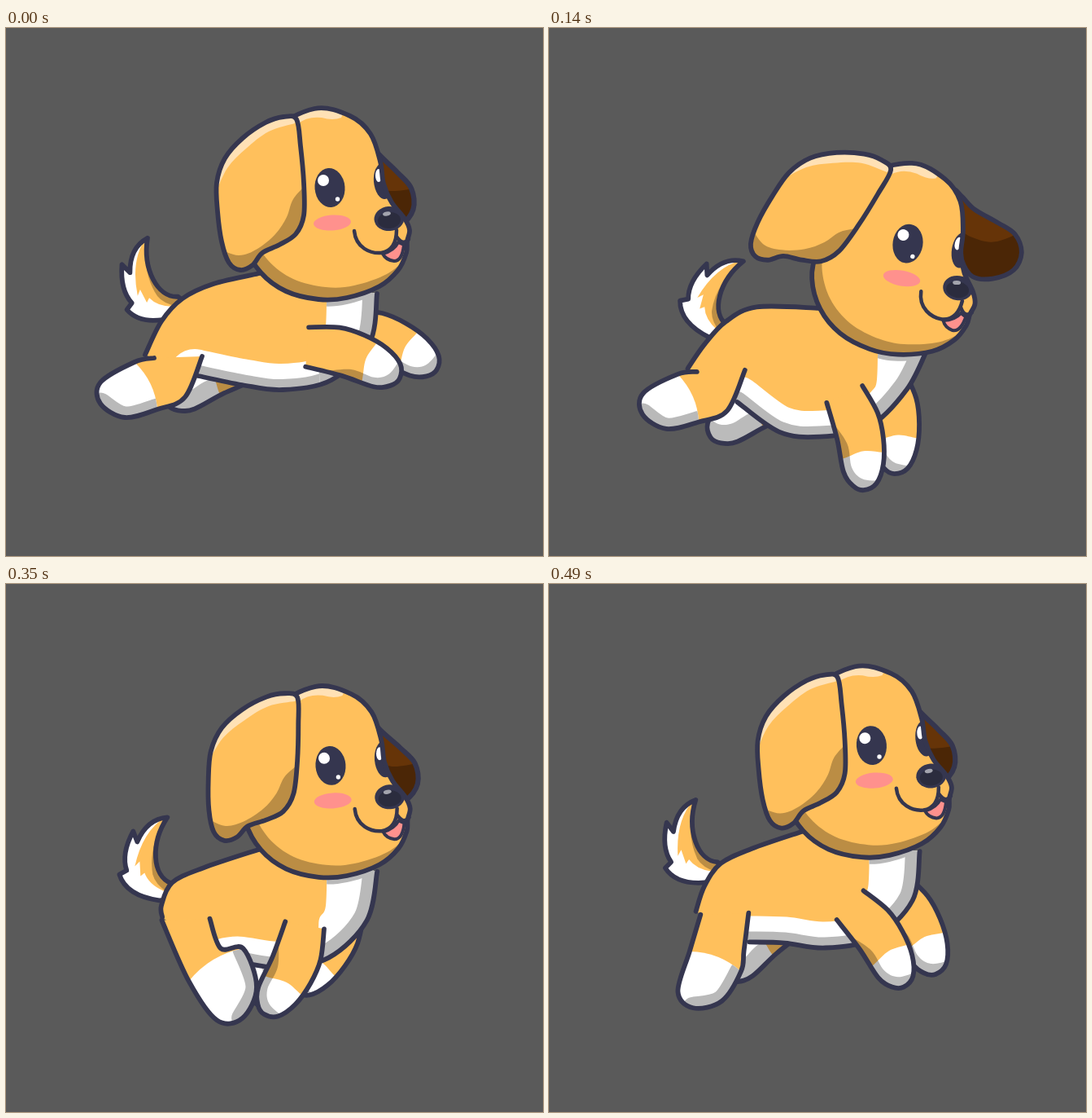
Animation, 660 px wide and 648 px high, one loop 560 ms. Source, as an HTML page with a canvas:

```html
<!DOCTYPE html>
<html lang="en">
<head>
<meta charset="utf-8">
<title>Running puppy</title>
<style>
  html, body { margin: 0; width: 100%; height: 100%; overflow: hidden; background: #5a5a5a; }
  canvas { display: block; }
</style>
</head>
<body>
<canvas id="stage" width="660" height="648"></canvas>
<script>
const ctx = document.getElementById('stage').getContext('2d');
const INK = '#35364f', FUR = '#ffc05c', WHITE = '#fff', GREY = '#b9b9b9', PINK = '#ff918d',
      GLOW = '#ffe1b5', BROWN = '#663408', SHADE = 'rgba(0,0,0,.265)';
const STEP_MS = 70, STEPS = 8;

const rad = deg => deg * Math.PI / 180;

// Straight tween through step, value pairs
function tween(step, ...keys) {
  let i = 0;
  while (keys[i + 2] <= step) i += 2;
  const [t0, v0, t1 = t0 + 1, v1 = v0] = keys.slice(i);
  return v0 + (v1 - v0) * (step - t0) / (t1 - t0);
}

// The whole run cycle follows from six signals.
function poseAt(step) {
  const drop = tween(step, 0, 0, 2.5, 1, 4, 1, 5, .37, 6, .07, 8, 0);
  const nod = tween(step, 0, 0, 2, 1, 4, .43, 5.3, -.1, 8, 0);
  const flap = tween(step, 0, 0, 2, 1, 4, .85, 5, .18, 6, 0);
  const reach = tween(step, 0, 71, 2, 11, 5, -25, 7, 33, 8, 71);
  const swing = tween(step, 0, 0, 2, -2, 4, 79, 5, 95, 7, 43, 8, 0);
  const wag = tween(step, 0, -24, 2, 18, 4, -7, 5, 0, 8, -24);

  const tuck = swing / 90;
  const shoulder = [370 - 9 * drop, 392 + 72 * drop];
  const hip = [213 + 9 * tuck, 413 + 21 * drop];
  const spine = [255 - 12 * tuck, 314 + 36 * drop + 20 * tuck];
  const throat = [456 + 10 * nod, 326 + 72 * drop + 8 * nod];
  return {
    drop, flap, reach, swing, wag, tuck, shoulder, hip, spine, throat,
    neck: [312 + 20 * nod, 301 + 66 * drop - 10 * nod],
    head: [398 + 43 * nod, 196 + 72 * drop + 11 * nod],
    tilt: 14 * nod
  };
}

// Smooth curve through flat x, y pairs
function trace(path, flat, closed = false) {
  const n = flat.length / 2;
  const at = i => {
    const k = closed ? (i + n) % n : Math.max(0, Math.min(n - 1, i));
    return [flat[2 * k], flat[2 * k + 1]];
  };
  for (let i = 0; i < (closed ? n : n - 1); i++) {
    const [a, b, c, d] = [at(i - 1), at(i), at(i + 1), at(i + 2)];
    path.bezierCurveTo(
      b[0] + (c[0] - a[0]) / 6, b[1] + (c[1] - a[1]) / 6,
      c[0] - (d[0] - b[0]) / 6, c[1] - (d[1] - b[1]) / 6, c[0], c[1]);
  }
  if (closed) path.closePath();
  return path;
}

function spline(flat, closed) {
  const path = new Path2D();
  path.moveTo(flat[0], flat[1]);
  return trace(path, flat, closed);
}

// Curve closed off with straight corners
function region(flat, corners) {
  const path = spline(flat);
  for (let i = 0; i < corners.length; i += 2) path.lineTo(corners[i], corners[i + 1]);
  path.closePath();
  return path;
}

const HEAD = spline([-19, -97, 25, -88, 50, -66, 62, -32, 66, -5, 76, 18, 92, 38, 98, 52,
  95, 66, 94, 80, 84, 101, 61, 121, 21, 135, -14, 137, -54, 127, -85, 104, -104, 70, -106, 35,
  -99, -15, -72, -68], true);
const HEAD_GLOW = new Path2D('M-60-110L25-110L14-86Q4-82-10-86Q-28-88-40-78L-60-76Z');
const EAR = spline([4, 2, -12, -1, -34, 6, -62, 25, -84, 50, -94, 80, -93, 115, -88, 152, -79, 178,
  -65, 187, -50, 181, -38, 166, -17, 156, 3, 143, 13, 120, 13, 80, 9, 35], true);
const EAR_GLOW = region([-96, 94, -81, 62, -58, 38, -30, 17, 2, 7], [2, -20, -110, -20]);
const EAR_SHADE = region([-94, 160, -67, 169, -44, 161, -22, 143, -8, 122, 0, 100, 18, 80],
  [40, 200, -94, 200]);
const FAR_EAR = spline([0, 5, 10, 12, 25, 29, 53, 47, 73, 62, 80, 85, 69, 106, 43, 115, 18, 111,
  6, 90, 0, 45], true);
const FAR_EAR_SHADE = region([0, 48, 20, 63, 48, 70, 85, 58], [100, 130, 0, 130]);
const LEG = spline([-23, 6, -19, 52, -19, 93, -11, 112, 1, 120, 18, 115, 31, 93, 37, 62, 36, 30, 24, -6]);
const LEG_SHADE = region([-22, 28, -8, 60, -8, 90, 2, 106, 24, 113], [24, 130, -60, 130, -60, 28]);
const SOCK = region([-40, 79, -15, 77, 10, 73, 33, 79, 50, 82], [50, 160, -40, 160]);
const TAIL = new Path2D('M5-90Q-20-88-32-60L-37-73Q-52-45-45-25L-54-20Q-46 6-5 12L20 10L10-9C-14-18-16-58 5-90Z');
const TAIL_FUR = new Path2D('M5-92Q-25-75-35-30L-29-36L-28-18L-23-22Q-18-8 0 0L30 0L30-92Z');
const TAIL_SHADE = new Path2D('M5-90Q-19-55-13-20Q-10-8 5 2L30 0L30-90Z');
const TONGUE = new Path2D('M65 81Q79 77 84 67L91 70Q89 90 79 90Q69 89 65 81Z');
const MOUTH = new Path2D('M30 53C32 74 50 81 63 80Q82 77 82 52M82 60Q90 72 97 63');

function fill(path, color) { ctx.fillStyle = color; ctx.fill(path); }

function stroke(path, width = 5.8, color = INK) {
  ctx.lineWidth = width;
  ctx.strokeStyle = color;
  ctx.stroke(path);
}

function dot(x, y, rx, ry, color, tilt = 0) {
  ctx.beginPath();
  ctx.ellipse(x, y, rx, ry, rad(tilt), 0, 2 * Math.PI);
  ctx.fillStyle = color;
  ctx.fill();
}

function within(path, draw) {
  ctx.save();
  ctx.clip(path);
  draw();
  ctx.restore();
}

function placed(x, y, deg, draw, sx = 1, sy = 1) {
  ctx.save();
  ctx.translate(x, y);
  ctx.rotate(rad(deg));
  ctx.scale(sx, sy);
  draw();
  ctx.restore();
}

// Base colour, clipped details, outline
function part(path, color, details) {
  fill(path, color);
  within(path, details);
  stroke(path);
}

function drawLeg(x, y, tilt, { flip = 1, sockLift = 0, shadeShift = 0 } = {}) {
  placed(x, y, -tilt, () => part(LEG, FUR, () => {
    ctx.translate(0, -sockLift);
    fill(SOCK, WHITE);
    ctx.translate(shadeShift, sockLift);
    fill(LEG_SHADE, SHADE);
  }), flip);
}

// The thigh stays on the body, the knee turns half as far as the paw.
function drawHindLeg({ hip, swing, tuck, drop }) {
  const stretch = 1 + tuck * (.1 + .27 * drop);
  const turned = (x, y, share = 1) => {
    const c = Math.cos(rad(swing * share)), s = Math.sin(rad(swing * share));
    return [hip[0] + stretch * (x * c + y * s), hip[1] + stretch * (y * c - x * s)];
  };
  const cuffBack = turned(-55, -3), cuffFront = turned(-27, 55), tip = turned(-97, 48);
  const sole = [...tip, ...turned(-67, 65), ...cuffFront];
  const leg = spline([hip[0] - 31, hip[1] - 8, ...cuffBack, ...turned(-97, 22), ...sole,
    ...turned(7, 40, .5), hip[0] + 28, hip[1] - 10]);

  const mid = [0, 1].map(k => (cuffBack[k] + cuffFront[k]) / 2);
  const beyond = (p, k) => [0, 1].map(i => p[i] + k * (tip[i] - mid[i]));
  const sock = new Path2D();
  sock.moveTo(...cuffBack);
  sock.quadraticCurveTo(...beyond(mid, -.2), ...cuffFront);
  sock.lineTo(...beyond(cuffFront, 2));
  sock.lineTo(...beyond(cuffBack, 2));

  part(leg, FUR, () => {
    fill(sock, WHITE);
    within(sock, () => stroke(spline(sole), 27, GREY));
  });
}

function drawTail({ spine, wag }) {
  placed(spine[0] - 49, spine[1] + 28, wag, () => part(TAIL, WHITE, () => {
    fill(TAIL_FUR, FUR);
    fill(TAIL_SHADE, SHADE);
  }));
}

function drawBody({ neck, spine, hip, shoulder, throat, head, tilt, drop, tuck }) {
  const [px, py] = spine, [sx, sy] = shoulder, [tx, ty] = throat;
  const back = [...neck, px, py, px - 38, py + 18, 191, py + 46, hip[0] - 42 + 11 * tuck, hip[1] - 12];
  const belly = [232 + 30 * tuck, 426 + 42 * drop + 25 * tuck, sx - 80, sy + 46, sx - 30, sy + 52,
    sx + 30, sy + 40, sx + 77, sy - 6, tx, ty];
  const underside = spline(belly);
  const torso = spline(back);
  torso.lineTo(belly[0], belly[1]);
  trace(torso, belly);
  const bib = region([tx - 62, ty - 40, tx - 63, ty + 40, tx - 72, ty + 65, tx - 68, ty + 140],
    [tx + 30, ty + 140, tx + 30, ty - 40]);

  fill(torso, FUR);
  within(torso, () => {
    stroke(underside, 64, WHITE);
    stroke(underside, 26, GREY);
    fill(bib, WHITE);
    within(bib, () => {
      stroke(underside, 35, GREY);
      placed(head[0], head[1] + 8, tilt, () => fill(HEAD, GREY));
    });
  });
  stroke(spline(back));
  stroke(underside);
}

function drawFace() {
  dot(66, -8, 12, 22, INK, -5);
  dot(60, -15, 4, 8, WHITE);
  dot(0, 0, 18.5, 24, INK, -5);
  dot(-8, -9, 7, 7, WHITE);
  dot(9.5, 14, 2.7, 2.7, WHITE);
  dot(3, 43, 23, 9.5, PINK, -4);
}

function drawMuzzle() {
  fill(TONGUE, PINK);
  stroke(TONGUE, 4);
  stroke(MOUTH, 4.5);
  dot(73, 38, 18.5, 15, INK, -5);
  dot(73, 40, 14, 10, '#2b2c3e', -5);
  dot(70, 32, 5, 2.5, '#a3a4ae', -12);
}

function drawHead({ head, tilt, flap }) {
  const rim = new Path2D();
  rim.rect(-200, -200, 400, 400);
  rim.addPath(HEAD, new DOMMatrix().translate(9, -15));
  const farSize = 1.08 - .08 * flap;

  placed(...head, tilt, () => {
    placed(37, -81, 12 - 15 * flap - tilt, () => part(FAR_EAR, BROWN, () => {
      fill(FAR_EAR_SHADE, SHADE);
    }), farSize, farSize);
    part(HEAD, FUR, () => {
      fill(HEAD_GLOW, GLOW);
      ctx.fillStyle = SHADE;
      ctx.fill(rim, 'evenodd');
      drawFace();
    });
    drawMuzzle();
    placed(-45, -86, 37 * flap - tilt, () => part(EAR, FUR, () => {
      fill(EAR_GLOW, GLOW);
      fill(EAR_SHADE, SHADE);
    }));
  });
}

function render(time) {
  const pose = poseAt(Math.floor(time / STEP_MS) % STEPS);
  const { shoulder: [sx, sy], reach, tuck, drop } = pose;
  ctx.fillStyle = '#5a5a5a';
  ctx.fillRect(0, 0, 660, 648);
  ctx.lineCap = ctx.lineJoin = 'round';
  drawTail(pose);
  drawLeg(305, 407 + 50 * drop - 22 * tuck ** 2, -62 + 66 * tuck ** 2,
    { flip: -1, sockLift: 20, shadeShift: 12 });
  drawLeg(sx + 50, sy - 22, reach - 6);
  drawBody(pose);
  drawHindLeg(pose);
  drawLeg(sx, sy, reach);
  drawHead(pose);
}

let start;
function tick(now) {
  start ??= now;
  render(now - start);
  requestAnimationFrame(tick);
}
render(0);
requestAnimationFrame(tick);
</script>
</body>
</html>
```
